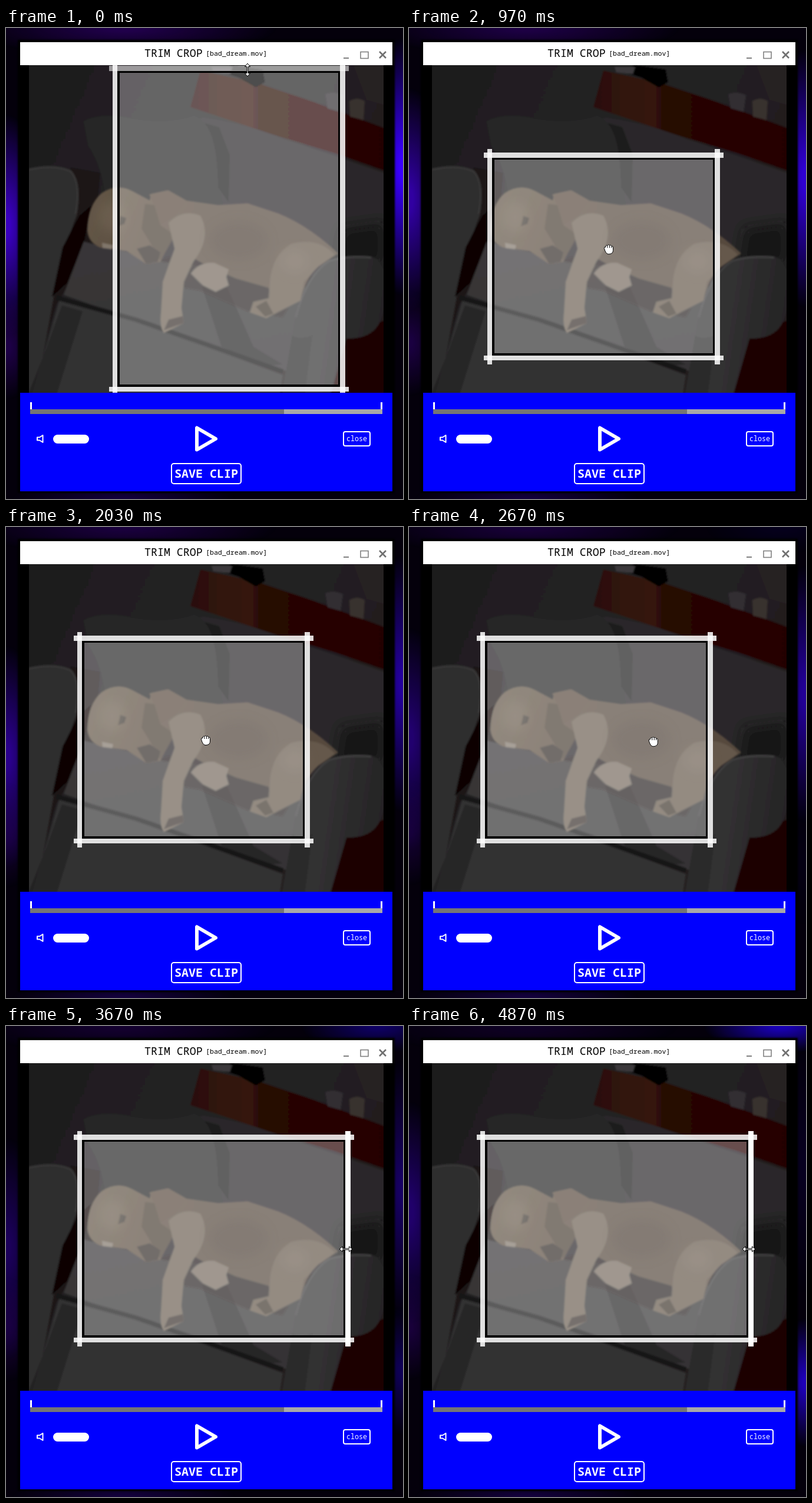
An HTML page that plays this animation: 674x798 px, repeating every 4910 ms.

```html
<!DOCTYPE html>
<html lang="en">
<head>
<meta charset="utf-8">
<title>Trim crop</title>
<style>
html, body { margin: 0; width: 100%; height: 100%; overflow: hidden; background: #04000b; }
body { position: relative; }
svg { position: absolute; left: 0; top: 0; display: block; }
text { font-family: "Noto Sans Mono", "DejaVu Sans Mono", monospace; font-weight: 500; }

.glow {
  position: absolute; left: calc(var(--x) - var(--rx)); top: calc(-1 * var(--ry));
  width: calc(2 * var(--rx)); height: calc(2 * var(--ry));
  background: radial-gradient(closest-side, var(--c) 10%, transparent);
  animation: 4910ms linear infinite;
}
.left { --x: 0px; --rx: 70px; --ry: 190px; --c: #4000d4; animation-name: left; }
.low { --x: 0px; --rx: 60px; --ry: 90px; --c: #2c0068; animation-name: low; }
.right { --x: 676px; --rx: 80px; --ry: 220px; --c: #3a00ff; animation-name: right; }
.corner { --x: 676px; --rx: 70px; --ry: 110px; --c: #2200d0; animation-name: corner; }
.roof { --x: 630px; --rx: 130px; --ry: 46px; --c: #1c00c8; animation-name: roof; }
.haze { --x: 200px; --rx: 260px; --ry: 50px; --c: #2a0060; animation-name: haze; }
.floor { --x: 200px; --rx: 190px; --ry: 34px; --c: #12003a; transform: translateY(798px); }

@keyframes left {
  0% { transform: translateY(335px); opacity: .9; }
  8.8% { transform: translateY(305px); opacity: .88; }
  19.8% { transform: translateY(290px); opacity: .75; }
  41.3% { transform: translateY(390px); opacity: .65; }
  66.6% { transform: translateY(330px); opacity: .35; }
  84.1% { transform: translateY(430px); opacity: .45; }
  100% { transform: translateY(310px); opacity: .48; }
}
@keyframes low {
  0%, 10% { transform: translateY(540px); opacity: .65; }
  45% { transform: translateY(520px); opacity: .4; }
  100% { transform: translateY(510px); opacity: .5; }
}
@keyframes right {
  0% { transform: translateY(235px); opacity: 1; }
  8.8% { transform: translateY(245px); opacity: .92; }
  19.8% { transform: translateY(255px); opacity: .82; }
  41.3% { transform: translateY(265px); opacity: .6; }
  66.6% { transform: translateY(300px); opacity: .55; }
  84.1% { transform: translateY(250px); opacity: .14; }
  100% { transform: translateY(240px); opacity: .08; }
}
@keyframes corner {
  0%, 50% { transform: translateY(570px); opacity: 0; }
  66.6% { transform: translateY(580px); opacity: .15; }
  84.1% { transform: translateY(590px); opacity: .65; }
  100% { transform: translateY(605px); opacity: .9; }
}
@keyframes roof {
  0%, 45% { opacity: 0; }
  66.6% { opacity: .2; }
  84.1% { opacity: .75; }
  100% { opacity: .9; }
}
@keyframes haze {
  0% { opacity: .75; }
  50% { opacity: .55; }
  100% { opacity: .3; }
}
</style>
</head>
<body>
<div class="glow left"></div>
<div class="glow low"></div>
<div class="glow right"></div>
<div class="glow corner"></div>
<div class="glow roof"></div>
<div class="glow haze"></div>
<div class="glow floor"></div>

<svg width="674" height="798" viewBox="0 0 674 798">
  <defs>
    <clipPath id="view"><rect x="39" y="63" width="602" height="555"/></clipPath>
    <filter id="soft" x="-5%" y="-5%" width="110%" height="110%"><feGaussianBlur stdDeviation="1.6"/></filter>
    <filter id="softer" x="-40%" y="-40%" width="180%" height="180%"><feGaussianBlur stdDeviation="9"/></filter>
    <filter id="edge" x="-5%" y="-5%" width="110%" height="110%"><feGaussianBlur stdDeviation="1.5"/></filter>
    <linearGradient id="wall" x2="1" y2=".4">
      <stop stop-color="#1d1c1d"/><stop offset=".6" stop-color="#242224"/><stop offset="1" stop-color="#221b1d"/>
    </linearGradient>
    <linearGradient id="shelf">
      <stop stop-color="#2b1009"/><stop offset=".3" stop-color="#35140c"/>
      <stop offset=".34" stop-color="#260805"/><stop offset="1" stop-color="#240000"/>
    </linearGradient>
    <linearGradient id="seat" x2=".4" y2="1">
      <stop stop-color="#383637"/><stop offset="1" stop-color="#343334"/>
    </linearGradient>
    <linearGradient id="arm" x2="1" y2=".2">
      <stop stop-color="#343434"/><stop offset=".5" stop-color="#313031"/><stop offset="1" stop-color="#252425"/>
    </linearGradient>
    <linearGradient id="fur" x2="1" y2=".2">
      <stop stop-color="#645747"/><stop offset=".45" stop-color="#57493d"/><stop offset="1" stop-color="#574a3e"/>
    </linearGradient>
  </defs>

  <rect x="20" y="20" width="640" height="768" filter="url(#edge)"/>
  <rect x="21" y="21" width="638" height="766"/>

  <g clip-path="url(#view)">
    <g filter="url(#soft)">
      <path fill="url(#wall)" d="M20 40H660V640H20Z"/>
      <!-- sofa back and pillow -->
      <path fill="#292829" d="M335 152Q420 165 470 188L560 218 660 252V420H150L170 260 250 170Z"/>
      <path fill="#252526" d="M132 158Q160 144 205 152 275 165 320 148 344 160 352 200L368 300 170 300Q165 235 140 200Z"/>
      <path fill="#1d1b1c" d="M335 160Q358 180 360 270L378 296 380 215 362 168Z"/>
      <!-- shelf and objects -->
      <path fill="url(#shelf)" d="M330 72L430 94 520 124 660 176V248L560 213 450 180 313 134Z"/>
      <path fill="#050505" d="M368 76L382 62 436 70 440 92 424 101 394 84Z"/>
      <path fill="#3a383a" d="M349 66H384L380 78 352 75Z"/>
      <path fill="#302d33" d="M542 112Q556 106 572 114L568 142 546 136Z"/>
      <path fill="#37302f" d="M583 124Q596 116 609 124L607 156 584 150Z"/>
      <path fill="#282022" d="M590 64H641V130L612 122Z"/>
      <!-- left arm -->
      <path fill="#1a1717" d="M110 236L160 245 150 360 85 470 60 560 85 340Z"/>
      <path fill="#2e2d2d" d="M30 242Q75 230 108 240 130 258 120 318 102 360 82 450L62 560 30 640Z"/>
      <path fill="none" stroke="#383737" stroke-width="3" d="M39 240Q84 230 110 243 128 264 118 315"/>
      <path fill="#070505" d="M145 300L134 358 104 432 78 456 96 372 124 318Z"/>
      <!-- seat -->
      <path fill="url(#seat)" d="M132 362L280 398 460 416 510 440 478 582 330 535 98 452Z"/>
      <path fill="#282728" d="M330 430L376 440 420 540 470 570 440 572 366 540Z"/>
      <path fill="#323132" d="M92 456L230 495 340 540 470 588 462 640H39L62 560Z"/>
      <path fill="none" stroke="#151315" stroke-width="8" d="M86 457L220 494 340 536 470 582"/>
      <path fill="#282728" d="M62 560L95 470 130 480 80 640H39Z"/>
      <!-- right arm -->
      <path fill="#151314" d="M570 340L641 330V400L560 402Z" filter="url(#softer)"/>
      <path fill="#1d0404" d="M580 515L660 490V640H535Z"/>
      <path fill="url(#arm)" d="M465 640L490 500Q503 425 545 396 575 382 622 388 650 398 642 465 640 528 578 526L545 640Z"/>
      <path fill="none" stroke="#403f40" stroke-width="3" d="M492 490Q510 420 548 395 580 385 620 389"/>
      <path fill="#2a292a" d="M465 640L486 520Q500 530 520 520L505 640Z"/>
    </g>
    <!-- dog -->
    <g filter="url(#soft)">
      <path fill="#211d1b" d="M255 395L300 380 440 420 490 455 470 490 410 480 330 445 300 440 290 400Z" opacity=".5"/>
      <path fill="url(#fur)" d="M138 343Q139 300 162 280 188 262 214 276L244 292 246 281 274 275 304 292 360 300 410 297 462 314Q516 336 564 382L530 405Q508 424 500 462L456 484 446 440 390 424 340 402 310 385 282 358 262 396 238 400 205 378 160 372Q140 364 138 343Z"/>
      <path fill="#584a3d" d="M243 282L276 275 306 292 288 316 262 334 254 304Z"/>
      <path fill="#443a31" d="M236 298L252 300 262 334 288 352 262 394 250 372 230 340Z" opacity=".65"/>
      <path fill="#6c6052" d="M276 330Q300 306 330 318 350 354 318 396L302 430 298 474 302 500 268 517Q260 506 263 482L266 430 286 374Z"/>
      <path fill="#766b5f" d="M314 416Q328 396 354 398L378 409 374 422 378 436 356 447 334 436Z"/>
      <path fill="#65594b" d="M448 430Q452 385 484 366 530 354 558 384L530 404 506 430 500 462 464 480 442 492 414 482 420 464 446 458Z"/>
      <path fill="#40372f" d="M424 472L442 462 454 484 440 489Z"/>
      <path fill="#342d2a" d="M222 374L244 368 262 380 258 396 238 400Z"/>
      <path fill="#2f2925" d="M194 318L204 322 201 332 190 336Z"/>
      <path fill="#3a332f" d="M268 512L276 494 300 488 302 500Z"/>
      <path fill="#80766a" d="M163 364L182 368 180 375 164 373Z"/>
    </g>
    <g filter="url(#softer)" opacity=".4">
      <ellipse cx="395" cy="360" rx="50" ry="34" fill="#443930"/>
      <ellipse cx="180" cy="320" rx="22" ry="26" fill="#7a6c5b"/>
      <ellipse cx="490" cy="395" rx="24" ry="20" fill="#786b5b"/>
    </g>

    <!-- crop box -->
    <rect id="glass" fill="#fff" fill-opacity=".3" stroke="#000" stroke-width="4"/>
    <g fill="#fff" fill-opacity=".85">
      <rect id="barL"/><rect id="barB"/><rect id="barT"/><rect id="barR"/>
    </g>
  </g>

  <!-- title bar -->
  <rect x="24" y="24" width="632" height="39" fill="#fff"/>
  <text x="235" y="49" font-size="18.3">TRIM CROP</text>
  <text x="339" y="47" font-size="11.6">[bad_dream.mov]</text>
  <g fill="none" stroke="#808080" stroke-width="2">
    <path d="M573 51H582"/>
    <rect x="602" y="40.5" width="13" height="11" stroke-width="1.6"/>
    <path d="M634 40L645 51M645 40L634 51" stroke="#707070" stroke-width="2.6"/>
  </g>

  <!-- controls -->
  <rect x="24" y="618" width="632" height="167" fill="#00f"/>
  <path fill="#757575" d="M41 646H472V654H41Z"/>
  <path fill="#a8a8a8" d="M472 646H639V654H472Z"/>
  <path fill="#fff" d="M41 634H44V646H41ZM636 634H639V646H636Z"/>
  <g fill="none" stroke="#fff" stroke-linejoin="round">
    <path stroke-width="2" d="M53 693.5H57L62.5 690V702L57 698.5H53Z"/>
    <path stroke-width="6" d="M324 677.5V714.5L356 696Z"/>
    <rect x="573" y="684" width="45" height="24" rx="3" stroke-width="2"/>
    <rect x="281" y="738" width="118" height="34" rx="4" stroke-width="2"/>
  </g>
  <rect x="80" y="689" width="61" height="15" rx="7.5" fill="#fff"/>
  <g fill="#fff">
    <text x="578" y="700" font-size="11.7">close</text>
    <text x="286" y="762" font-size="20" style="font-weight:600">SAVE CLIP</text>
  </g>

  <!-- pointer -->
  <g id="pointer" fill="#fff" stroke="#000" stroke-width="1" stroke-linejoin="round">
    <path id="resize" d="M0 -11L4.5 -5.5H1V5.5H4.5L0 11 -4.5 5.5H-1V-5.5H-4.5Z"/>
    <path id="hand" d="M-7.5 -1Q-8 -4 -5 -3.5V-5Q-4 -7.5 -2 -6 -.5 -8.5 1.5 -6.3 3.5 -7.8 4.8 -5 7.5 -5.5 7.5 -2.5V2Q7.5 8 1 8.5H-1Q-5 8 -7.5 -1ZM-2 -5.5V-2M1.5 -6V-2M4.8 -4.5V-2"/>
  </g>
</svg>

<script>
const LOOP = 4910;
const el = id => document.getElementById(id);
const smooth = s => s * s * (3 - 2 * s);

// keys: [time, value] pairs, eased between and held at both ends
function track(keys, t) {
  if (t <= keys[0][0]) return keys[0][1];
  for (let i = 1; i < keys.length; i++) {
    const [t0, a] = keys[i - 1], [t1, b] = keys[i];
    if (t < t1) return a + (b - a) * smooth((t - t0) / (t1 - t0));
  }
  return keys[keys.length - 1][1];
}

const paths = {
  top: [[0, 72], [492, 272]],
  dx: [[700, 0], [1079, -60]],
  dy: [[700, 0], [1143, -80]],
  grow: [[3080, 0], [3570, 69]],
  px: [[0, 410], [430, 418], [520, 418], [700, 399], [960, 339], [2350, 339], [3050, 512], [3470, 577]],
  py: [[0, 71], [465, 259], [530, 259], [700, 441], [1067, 361], [2350, 361], [3050, 366], [3470, 378]],
  topGlow: [[0, .55], [150, 1], [540, 1], [640, .85]],
  rightGlow: [[2950, .85], [3050, 1]]
};

function place(id, x, y, w, h) {
  const r = el(id);
  r.setAttribute("x", x);
  r.setAttribute("y", y);
  r.setAttribute("width", w);
  r.setAttribute("height", h);
}

function draw(t) {
  const at = name => track(paths[name], t);
  const dx = Math.round(at("dx")), dy = Math.round(at("dy"));
  const L = 189 + dx, T = Math.round(at("top")) + dy;
  const R = 568 + dx + Math.round(at("grow")), B = 608 + dy;

  place("glass", L + 2, T + 2, R - L - 4, B - T - 4);
  place("barL", L - 8, T - 14, 8, B - T + 29);
  place("barR", R - 1, T - 14, 9, B - T + 29);
  place("barT", L - 14, T - 8, R - L + 28, 9);
  place("barB", L - 14, B, R - L + 28, 8);
  el("barT").setAttribute("fill-opacity", at("topGlow"));
  el("barR").setAttribute("fill-opacity", at("rightGlow"));

  const grab = t > 600 && t < 2950;
  el("hand").style.display = grab ? "" : "none";
  el("resize").style.display = grab ? "none" : "";
  el("resize").setAttribute("transform", t > 2000 ? "rotate(90)" : "");
  el("pointer").setAttribute("transform", `translate(${at("px")} ${at("py")})`);
}

function tick() {
  draw(performance.now() % LOOP);
  requestAnimationFrame(tick);
}
draw(0);
requestAnimationFrame(tick);
</script>
</body>
</html>
```
